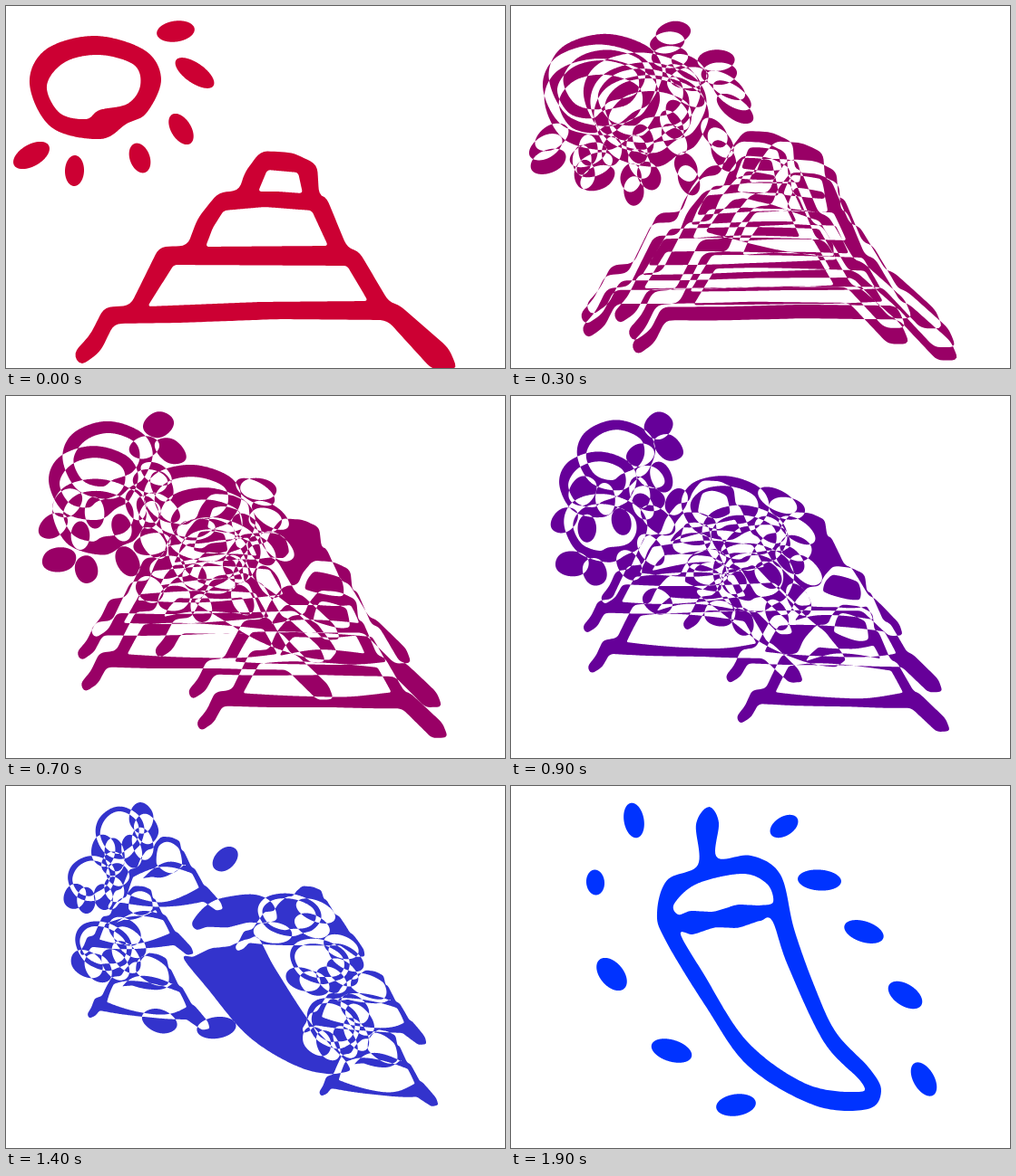
Write an HTML page with a canvas that moves like this. It is 550 by 400 pixels and loops after 1920 ms.

```html
<!DOCTYPE html>
<html lang="en">
<head>
<meta charset="utf-8">
<title>Sun and pyramid become a chili</title>
<style>
html, body { margin: 0; width: 100%; height: 100%; overflow: hidden; background: #fff; }
canvas { display: block; }
</style>
</head>
<body>
<canvas id="stage" width="550" height="400"></canvas>
<script>
const SAMPLES = 300, STEPS = 19, STEP_MS = 100, LOOP_MS = 1920;
const ctx = document.getElementById('stage').getContext('2d');

const mix = (p, q, t) => [p[0] + (q[0] - p[0]) * t, p[1] + (q[1] - p[1]) * t];
const distance = (p, q) => Math.hypot(q[0] - p[0], q[1] - p[1]);
const points = text => text.trim().split(/\s+/).map(p => p.split(',').map(Number));

// Even spacing along the outline, starting at its lower left, so any two can blend.
function resample(path) {
  const loop = [...path, path[0]], dist = [0];
  for (let i = 1; i < loop.length; i++) dist.push(dist[i - 1] + distance(loop[i - 1], loop[i]));
  const total = dist[dist.length - 1], out = [];
  for (let k = 0, i = 0; k < SAMPLES; k++) {
    const at = total * k / SAMPLES;
    while (dist[i + 1] <= at) i++;
    out.push(mix(loop[i], loop[i + 1], (at - dist[i]) / (dist[i + 1] - dist[i])));
  }
  const lean = out.map(([x, y]) => x - 0.3 * y);
  const first = lean.indexOf(Math.min(...lean));
  return [...out.slice(first), ...out.slice(0, first)];
}

// Closed Catmull-Rom curve through the knots.
function curve(knots) {
  const n = knots.length;
  return resample(knots.flatMap((b, i) => {
    const a = knots[(i + n - 1) % n], c = knots[(i + 1) % n], d = knots[(i + 2) % n];
    return Array.from({ length: 12 }, (_, s) => [0, 1].map(j => {
      const u = s / 12;
      return b[j] + 0.5 * u * (c[j] - a[j] + u * (2 * a[j] - 5 * b[j] + 4 * c[j] - d[j] +
        u * (3 * b[j] - a[j] - 3 * c[j] + d[j])));
    }));
  }));
}

// Polygon with rounded corners.
function polygon(corners, radius) {
  const n = corners.length;
  return resample(corners.flatMap((p, i) => {
    const [from, to] = [corners[(i + n - 1) % n], corners[(i + 1) % n]]
      .map(q => mix(p, q, Math.min(0.5, radius / distance(p, q))));
    return Array.from({ length: 7 }, (_, s) => mix(mix(from, p, s / 6), mix(p, to, s / 6), s / 6));
  }));
}

function blob([cx, cy, rx, ry, degrees]) {
  const turn = degrees * Math.PI / 180, cos = Math.cos(turn), sin = Math.sin(turn);
  return resample(Array.from({ length: 60 }, (_, i) => {
    const a = i * Math.PI / 30, x = rx * Math.cos(a), y = ry * Math.sin(a);
    return [cx + x * cos - y * sin, cy + x * sin + y * cos];
  }));
}

// Wavy edge between two points.
function ripple(from, to) {
  return Array.from({ length: 9 }, (_, i) => {
    const [x, y] = mix(from, to, i / 8);
    return [x, y + 2 * Math.sin(i * Math.PI / 2)];
  });
}

const sunOuter = curve(points('26,86 44,48 98,33 153,49 171,81 155,118 133,130 104,147 50,134'));
const sunInner = curve(points('45,88 65,62 103,54 141,65 148,88 134,108 103,115 88,125 59,118'));
const rays = [
  [187, 28, 21, 11.5, -8], [208, 74, 25, 11, 35], [193, 136, 19, 11, 58],
  [147.5, 168, 17, 11, 70], [75.5, 182, 17, 10.5, 92], [28, 165, 22, 12, -30]
].map(blob);

const pyramid = polygon(points(`74,384 93,363 108,333 137,331 169,266 200,265 211,235 234,206
  257,204 263,184 281,160 316,162 343,175 345,209 353,211 376,267 389,271 422,327 433,330
  488,378 498,402 470,402 420,347 300,346 192,350 119,351 104,382 82,398`), 9);
const [topHole, midHole, lowHole] = [
  '278,205 288,181 322,184 327,207 300,205',
  '220,266 228,245 240,226 285,222 337,226 355,265',
  '156,332 185,286 376,287 399,326 280,327'
].map(text => polygon(points(text), 4));

const pepper = curve(points(`161,140 172,104 206,87 204,42 218,23 229,40 227,79 265,77 297,98
  312,158 334,220 358,272 395,312 408,337 393,357 335,353 262,310 215,244 170,170`));
const capHole = curve([...points('180,130 205,108 255,97 282,108'),
  ...ripple([289, 128], [184, 142])]);
const bodyHole = curve([...ripple([187, 164], [288, 149]),
  ...points('305,198 345,283 386,327 382,338 325,329 260,282 212,207')]);
const dashes = [
  [135.5, 38, 19.5, 11, 80], [93, 106.5, 14, 10, 85], [111, 208, 21, 13, 50],
  [177, 292.5, 23, 12, 17], [248, 352.5, 22, 12, -8], [301, 44.5, 17, 10.5, -32],
  [340, 104, 24, 11.5, 4], [389, 161, 22.5, 11.5, 18], [434.5, 231, 21, 12, 33],
  [455, 324, 20.5, 11.5, 60]
].map(blob);

const sunAndRays = [sunOuter, sunInner, ...rays];
const startShapes = [...sunAndRays, pyramid, topHole, midHole, lowHole];
const endShapes = [pepper, capHole, bodyHole, ...dashes];

// The middle hole winds the other way, so it turns inside out inside a dash.
const drawing = [...sunAndRays, pyramid, topHole, [...midHole].reverse(), lowHole];

// Single parts travel to their own place; five dashes each absorb the whole drawing.
const blends = [
  [pyramid, dashes[6]], [topHole, capHole], [midHole, bodyHole],
  [rays[0], dashes[4]], [rays[3], dashes[3]], [rays[4], dashes[5]],
  ...[sunOuter, sunInner, rays[1], rays[2], rays[5]].map(shape => [shape, dashes[7]]),
  ...[0, 1, 2, 8, 9].flatMap(i => drawing.map(shape => [shape, dashes[i]]))
];

// Colours snap to multiples of 51.
function colour(t) {
  const levels = [4 - 4 * t, t, 0.96 + 4 * t];
  return `rgb(${levels.map(v => Math.round(v) * 51).join()})`;
}

function shapesAt(step) {
  if (step === 0) return startShapes;
  if (step === STEPS) return endShapes;
  return blends.map(([from, to]) => from.map((p, i) => mix(p, to[i], step / STEPS)));
}

function draw(step) {
  ctx.fillStyle = '#fff';
  ctx.fillRect(0, 0, 550, 400);
  ctx.beginPath();
  for (const shape of shapesAt(step)) {
    shape.forEach(([x, y], i) => i ? ctx.lineTo(x, y) : ctx.moveTo(x, y));
    ctx.closePath();
  }
  ctx.fillStyle = colour(step / STEPS);
  ctx.fill('evenodd');
}

let shown = 0;
const began = performance.now();
function tick() {
  const time = (performance.now() - began) % LOOP_MS;
  const step = Math.min(STEPS, Math.floor(time / STEP_MS));
  if (step !== shown) draw(shown = step);
  requestAnimationFrame(tick);
}
draw(0);
requestAnimationFrame(tick);
</script>
</body>
</html>
```
